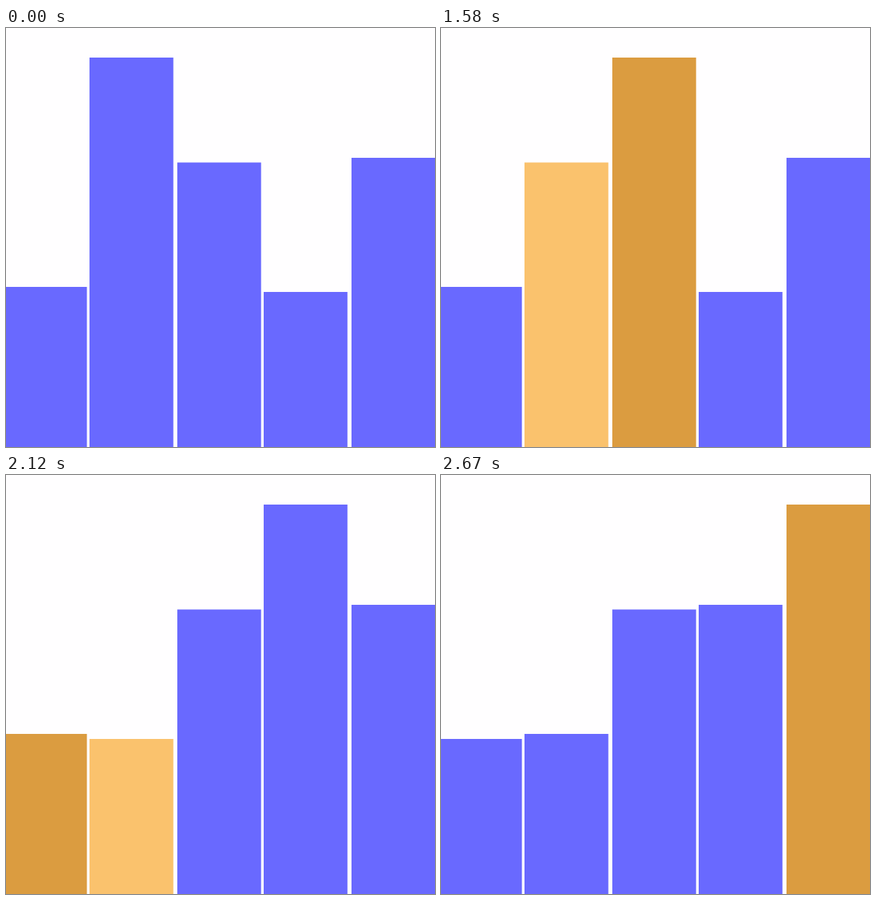
Animation, 596 px wide and 581 px high, one loop 2700 ms. Source, as an HTML page with a canvas:

```html
<!DOCTYPE html>
<html lang="en">
<head>
<meta charset="utf-8">
<title>Insertion sort</title>
<style>
html, body { margin: 0; width: 100%; height: 100%; overflow: hidden; background: #fffeff; }
canvas { display: block; }
</style>
</head>
<body>
<canvas id="stage" width="596" height="581"></canvas>
<script>
const W = 596, H = 581, LOOP = 2700;
const BLUE = '#6969ff', KEY = '#fac26d', COMPARE = '#db9c40';
const ctx = document.getElementById('stage').getContext('2d');

const tops = [359, 41, 186.5, 366, 180];
const slots = [[0, 112.4], [116, 232.5], [238, 354.4], [358, 474.4], [480, 596]];

const paint = (i, color) => bars => { bars[i].color = color; };
const swap = i => bars => { [bars[i], bars[i + 1]] = [bars[i + 1], bars[i]]; };

// Each step of the sort and the time it takes effect
const steps = [
  [1420, paint(1, KEY)],
  [1470, paint(1, BLUE)],
  [1470, paint(2, KEY)],
  [1520, paint(1, COMPARE)],
  [1570, swap(1)],
  [1640, paint(2, BLUE)],
  [1640, paint(1, BLUE)],
  [1690, paint(3, KEY)],
  [1750, paint(2, COMPARE)],
  [1810, swap(2)],
  [1870, paint(3, BLUE)],
  [1920, paint(1, COMPARE)],
  [1970, swap(1)],
  [2030, paint(2, BLUE)],
  [2080, paint(0, COMPARE)],
  [2140, swap(0)],
  [2200, paint(1, BLUE)],
  [2260, paint(0, BLUE)],
  [2360, paint(4, KEY)],
  [2420, paint(3, COMPARE)],
  [2520, swap(3)],
  [2600, paint(3, BLUE)]
];

function draw(t) {
  const bars = tops.map(top => ({ top, color: BLUE }));
  for (const [at, apply] of steps) if (t >= at) apply(bars);
  ctx.fillStyle = '#fffeff';
  ctx.fillRect(0, 0, W, H);
  bars.forEach(({ top, color }, i) => {
    const [left, right] = slots[i];
    ctx.fillStyle = color;
    ctx.fillRect(left, top, right - left, H - top);
  });
}

const start = performance.now();
function tick() {
  draw((performance.now() - start) % LOOP);
  requestAnimationFrame(tick);
}
tick();
</script>
</body>
</html>
```
